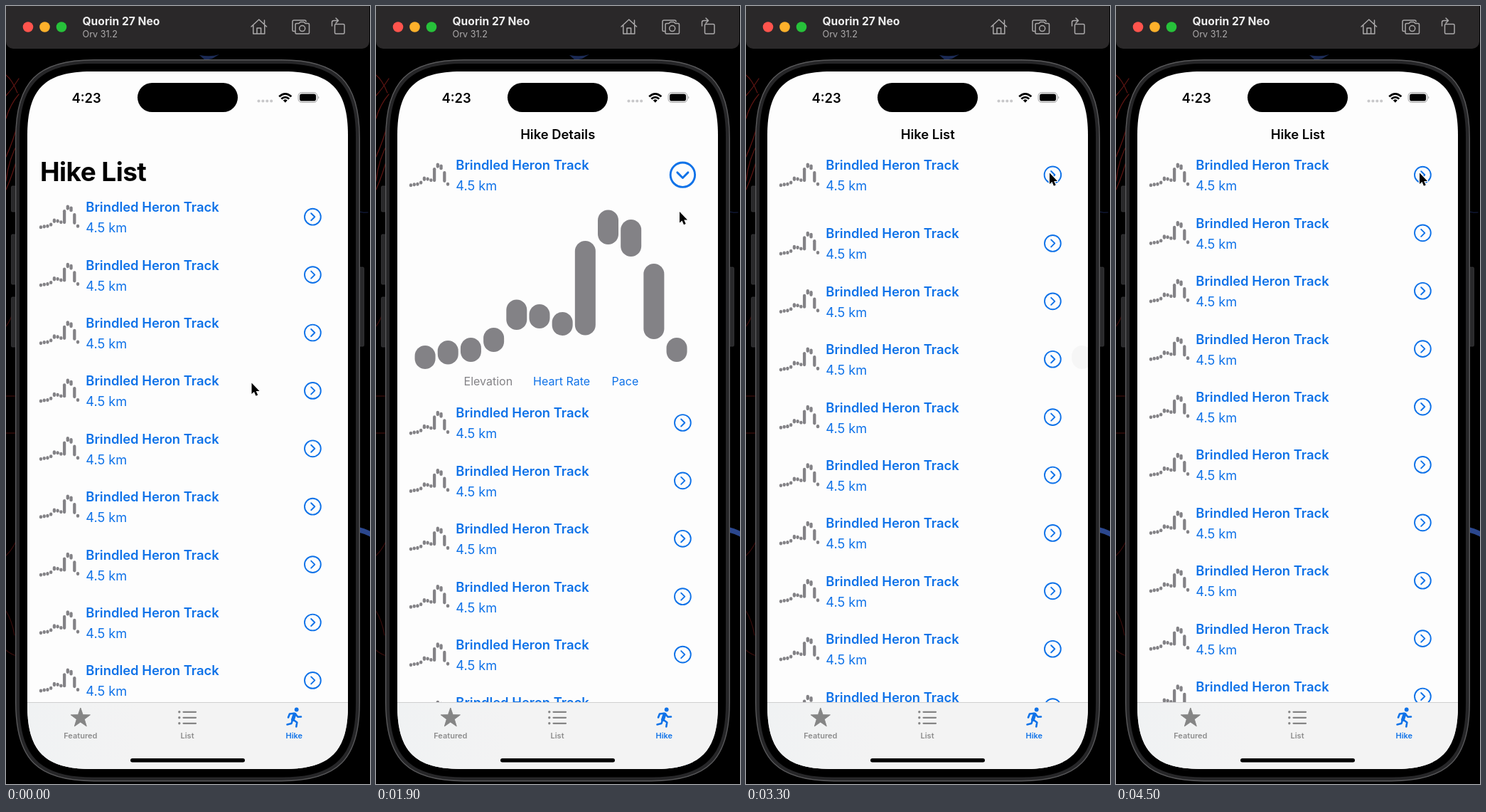
An HTML page that plays this animation: 512x1093 px, repeating every 4600 ms.

```html
<!DOCTYPE html>
<html lang="en">
<head>
<meta charset="utf-8">
<title>Hike list</title>
<style>
  html, body { margin: 0; width: 100%; height: 100%; overflow: hidden; background: #000; }
  svg { display: block; width: 100%; height: 100%; font-family: Inter, Roboto, sans-serif; }
  .line { fill: none; stroke-linecap: round; stroke-linejoin: round; }
  .semi { font-size: 18.4px; font-weight: 600; }
  .tab { font-size: 11px; font-weight: 600; text-anchor: middle; }
  .nav { text-anchor: middle; }
</style>
</head>
<body>
<svg id="stage" viewBox="0 0 512 1093">
  <defs>
    <clipPath id="clip"><path id="glass"/></clipPath>
    <linearGradient id="tabs"><stop stop-color="#f0f2f3"/><stop offset=".35" stop-color="#f3f3f3"/></linearGradient>
    <g id="mini" fill="#838286"></g>
    <g id="arrow" class="line" stroke="#0f72e8" stroke-width="1.9">
      <circle r="11.4"/><path d="M-2.2-5 2.9 0-2.2 5"/>
    </g>
    <g id="row" fill="#0f72e8">
      <use href="#mini"/>
      <text class="semi" x="112.3" y="-7">Brindled Heron Track</text>
      <text font-size="18.2" x="112.3" y="22">4.5 km</text>
    </g>
  </defs>

  <!-- wallpaper -->
  <g class="line" stroke="#5c1512" stroke-width="1.2">
    <path d="M0 97Q9 104 16 122M0 126Q9 116 18 102M0 158Q6 138 18 124M0 212Q10 190 17 164M0 246Q4 214 17 192M0 258Q9 238 16 212"/>
    <path d="M0 548H16M0 600H16" stroke="#4b100e"/>
    <path d="M0 772Q9 764 16 748M0 850Q8 862 12 884M0 905Q7 911 15 913M0 450Q8 440 16 412" stroke="#3a0d0c"/>
  </g>
  <path d="M272 69Q288 72 300 68L290 74 280 76Z" fill="#1b2a55"/>
  <path d="M497 736Q505 738 513 742" class="line" stroke="#2b478f" stroke-width="7"/>
  <path d="M497 289Q503 291 509 290" class="line" stroke="#17224a"/>

  <!-- toolbar -->
  <rect x="0" y="-12" width="511" height="72" rx="10" fill="#2a2829"/>
  <circle cx="31" cy="29.5" r="7.3" fill="#ff544d"/>
  <circle cx="54.5" cy="29.5" r="7.3" fill="#fdb02b"/>
  <circle cx="78" cy="29.5" r="7.3" fill="#27c13a"/>
  <text x="107.5" y="27" font-size="15.6" font-weight="700" fill="#ededed">Quorin 27 Neo</text>
  <text x="107.5" y="44" font-size="12.6" fill="#afadae">Orv 31.2</text>
  <g class="line" stroke="#aba9aa" stroke-width="1.5">
    <path d="M345 29 355.8 19 366.6 29M347.8 27V39H363.8V27M363.5 25V20M353 39V31H358.6V39"/>
    <path d="M406.5 35.5H404.5Q403 35.5 403 34V22Q403 20 405 20H420Q422 20 422 22"/>
    <path d="M409 24.5H412L414 22.5H419L421 24.5H425Q426.5 24.5 426.5 26V37.5Q426.5 39 425 39H408.5Q407 39 407 37.5V26Q407 24.5 409 24.5Z"/>
    <circle cx="416.7" cy="31.6" r="4"/>
    <rect x="462.5" y="25.5" width="13.5" height="13.5" rx="1.5"/>
    <path d="M458.5 28V23Q458.5 20.5 461 20.5H467M464 17 467.5 20.5 464 24"/>
  </g>

  <!-- device -->
  <g fill="#29292b" stroke="#39393b" stroke-width=".8">
    <rect x="7.5" y="253" width="9" height="36" rx="1.5"/>
    <rect x="7.5" y="321" width="9" height="70" rx="1.5"/>
    <rect x="7.5" y="409" width="9" height="70" rx="1.5"/>
    <rect x="494" y="367" width="9.5" height="111" rx="1.5"/>
  </g>
  <path id="shell" fill="#262628" stroke="#58585a" stroke-width="1.4"/>
  <path id="bezel"/>
  <use href="#glass" fill="#fdfdfd"/>

  <g clip-path="url(#clip)">
    <g id="rows"></g>
    <g id="chart" font-size="16">
      <g id="bars" fill="#838286"></g>
      <text x="133" y="532.8" fill="#838286">Elevation</text>
      <text x="230.5" y="532.8" fill="#0f72e8">Heart Rate</text>
      <text x="341" y="532.8" fill="#0f72e8">Pace</text>
    </g>
    <rect x="30" y="978" width="451" height="95" fill="url(#tabs)"/>
    <path d="M30 978.5H481" stroke="#cfcfd0"/>
  </g>

  <!-- status and titles -->
  <text class="semi" x="92.5" y="135.5">4:23</text>
  <rect x="185" y="108" width="141" height="41" rx="20.5"/>
  <path d="M355.5 133.5H374" class="line" stroke="#c8c8ca" stroke-width="4.2" stroke-dasharray="0 5.9"/>
  <path d="M384.2 127.3Q392.8 119.3 401.4 127.3M387.3 130.6Q392.8 125.6 398.3 130.6" fill="none" stroke="#000" stroke-width="2.7"/>
  <path d="M389.8 132.6Q392.8 129.8 395.8 132.6L392.8 135.8Z"/>
  <rect x="411.2" y="121.7" width="26.5" height="13.6" rx="4.3" fill="none" stroke="#9b9b9c"/>
  <rect x="413" y="123.5" width="23" height="10" rx="2.8"/>
  <path d="M439.2 126.2Q441.5 128.5 439.2 130.8Z" fill="#9b9b9c"/>
  <text id="large" x="48" y="246" font-size="37" font-weight="700" letter-spacing="-.015em">Hike List</text>
  <text id="inline" class="semi nav" x="255.7" y="186.7"></text>

  <!-- tab bar -->
  <path id="star" fill="#858585" stroke="#858585" stroke-linejoin="round"/>
  <g class="line" stroke="#858585" stroke-width="2.2">
    <path d="M249.5 991.8H267M249.5 999.8H267M249.5 1007.8H267"/>
    <path d="M243.8 991.8h0M243.8 999.8h0M243.8 1007.8h0" stroke-width="3.4"/>
  </g>
  <g class="line" stroke="#0f72e8" stroke-width="2.6">
    <circle cx="408.7" cy="988.5" r="2.9" fill="#0f72e8" stroke="none"/>
    <path d="M406 995 403.5 1002.5" stroke-width="5"/>
    <path d="M407 994.5 410.5 998.8 415 998.5M405 993.8 399 994.5 397 999.5M404.5 1003 409.3 1006.5 408.3 1012.5M403 1003 401.5 1008 395.5 1009.5"/>
  </g>
  <g class="tab" fill="#8d8d8d">
    <text x="104.8" y="1029">Featured</text>
    <text x="255" y="1029">List</text>
    <text x="405.3" y="1029" fill="#0f72e8">Hike</text>
  </g>
  <rect x="175" y="1057" width="161" height="5.5" rx="2.75"/>

  <path id="cursor" d="M0 0V15.6L3.5 12.4 6 18.3 8.7 17.1 6.2 11.4H11Z" stroke="#fff" stroke-width="2.4" paint-order="stroke" stroke-linejoin="round"/>
</svg>
<script>
const NS = 'http://www.w3.org/2000/svg';
const $ = id => document.getElementById(id);
const add = (parent, tag, attrs) => {
  const el = document.createElementNS(NS, tag);
  for (const key in attrs) el.setAttribute(key, attrs[key]);
  return parent.appendChild(el);
};

const LOOP = 4600, STEP = 100;
const OPEN = 969, CLOSE = 2845;   // taps on the first row
const PITCH = 81.4, GROWTH = 261, SLIDE = 418;

// rounded box whose corners flow smoothly into the sides
function smoothBox(x, y, w, h, r) {
  const e = 1.28 * r, c = 0.355 * r, R = x + w, B = y + h;
  return `M${x + e} ${y}H${R - e}C${R - c} ${y} ${R} ${y + c} ${R} ${y + e}` +
    `V${B - e}C${R} ${B - c} ${R - c} ${B} ${R - e} ${B}` +
    `H${x + e}C${x + c} ${B} ${x} ${B - c} ${x} ${B - e}` +
    `V${y + e}C${x} ${y + c} ${x + c} ${y} ${x + e} ${y}Z`;
}
$('shell').setAttribute('d', smoothBox(13.7, 75.7, 483.6, 1013, 86));
$('bezel').setAttribute('d', smoothBox(19, 81, 473, 1002.5, 81));
$('glass').setAttribute('d', smoothBox(30, 92, 451, 980, 70));

// top and bottom of each bar in the elevation chart
const bars = [[477, 510], [470, 503.5], [466, 500], [452, 486], [412.5, 455], [419, 453],
  [430, 463], [330, 462.5], [286.5, 335], [300, 352], [362, 468], [466, 500]];

function drawBars(parent, x0, pitch, width, mapY) {
  bars.forEach(([top, bottom], i) => {
    const y = mapY(top);
    add(parent, 'rect', { x: x0 + i * pitch - width / 2, y, width,
      height: mapY(bottom) - y, rx: width / 2 });
  });
}
drawBars($('bars'), 78.5, 32.18, 29, y => y);
drawBars($('mini'), 49, 4.73, 4.3, y => (y - 286.5) * 0.152 - 16.8);

$('star').setAttribute('d', 'M' + Array.from({ length: 10 }, (_, i) => {
  const r = i % 2 ? 5.7 : 14.3, a = Math.PI * (i / 5 - 0.5);
  return [104.8 + r * Math.cos(a), 1000.3 + r * Math.sin(a)].map(v => v.toFixed(2));
}).join('L') + 'Z');

const rows = Array.from({ length: 10 }, () => {
  const g = add($('rows'), 'g', {});
  add(g, 'use', { href: '#row' });
  return { g, arrow: add(g, 'use', { href: '#arrow' }) };
});

// one-second spring with a bounce of 0.3
function spring(ms) {
  if (ms <= 0) return 0;
  const w = 2 * Math.PI, z = 0.7, d = Math.sqrt(1 - z * z), t = ms / 1000;
  return 1 - Math.exp(-z * w * t) * (Math.cos(w * d * t) + z / d * Math.sin(w * d * t));
}

// cursor stops: time, x, y
const stops = [[0, 345.5, 529.5], [50, 345.5, 529.5], [600, 427, 289], [2000, 427, 289],
  [2500, 427, 234.5], [LOOP, 427, 234.5]];

function cursorAt(t) {
  const i = stops.findIndex(s => s[0] > t);
  const [t0, x0, y0] = stops[i - 1], [t1, x1, y1] = stops[i];
  const k = (t - t0) / (t1 - t0), e = k * k * (3 - 2 * k);
  return [x0 + (x1 - x0) * e, y0 + (y1 - y0) * e];
}

function render(t) {
  const tapped = t >= OPEN, open = tapped && t < CLOSE;
  const p = spring(t - OPEN) - spring(t - CLOSE);

  rows.forEach(({ g, arrow }, i) => {
    const y = (tapped ? 237.2 : 296.2) + i * PITCH + (i ? p * GROWTH : 0);
    const pose = i ? '' : `rotate(${open ? 90 : 0}) scale(${1 + p / 2})`;
    g.setAttribute('transform', `translate(0 ${y})`);
    arrow.setAttribute('transform', `translate(431.4 0) ${pose}`);
  });

  $('chart').setAttribute('transform', `translate(${(1 - p) * SLIDE} 0)`);
  $('chart').setAttribute('opacity', Math.max(0, Math.min(1, p)));
  $('large').setAttribute('visibility', tapped ? 'hidden' : 'visible');
  $('inline').textContent = tapped ? (open ? 'Hike Details' : 'Hike List') : '';
  $('cursor').setAttribute('transform', `translate(${cursorAt(t)})`);
}

const start = performance.now();
function tick() {
  const t = (performance.now() - start) % LOOP;
  render(Math.floor(t / STEP) * STEP);
  requestAnimationFrame(tick);
}
tick();
</script>
</body>
</html>
```
